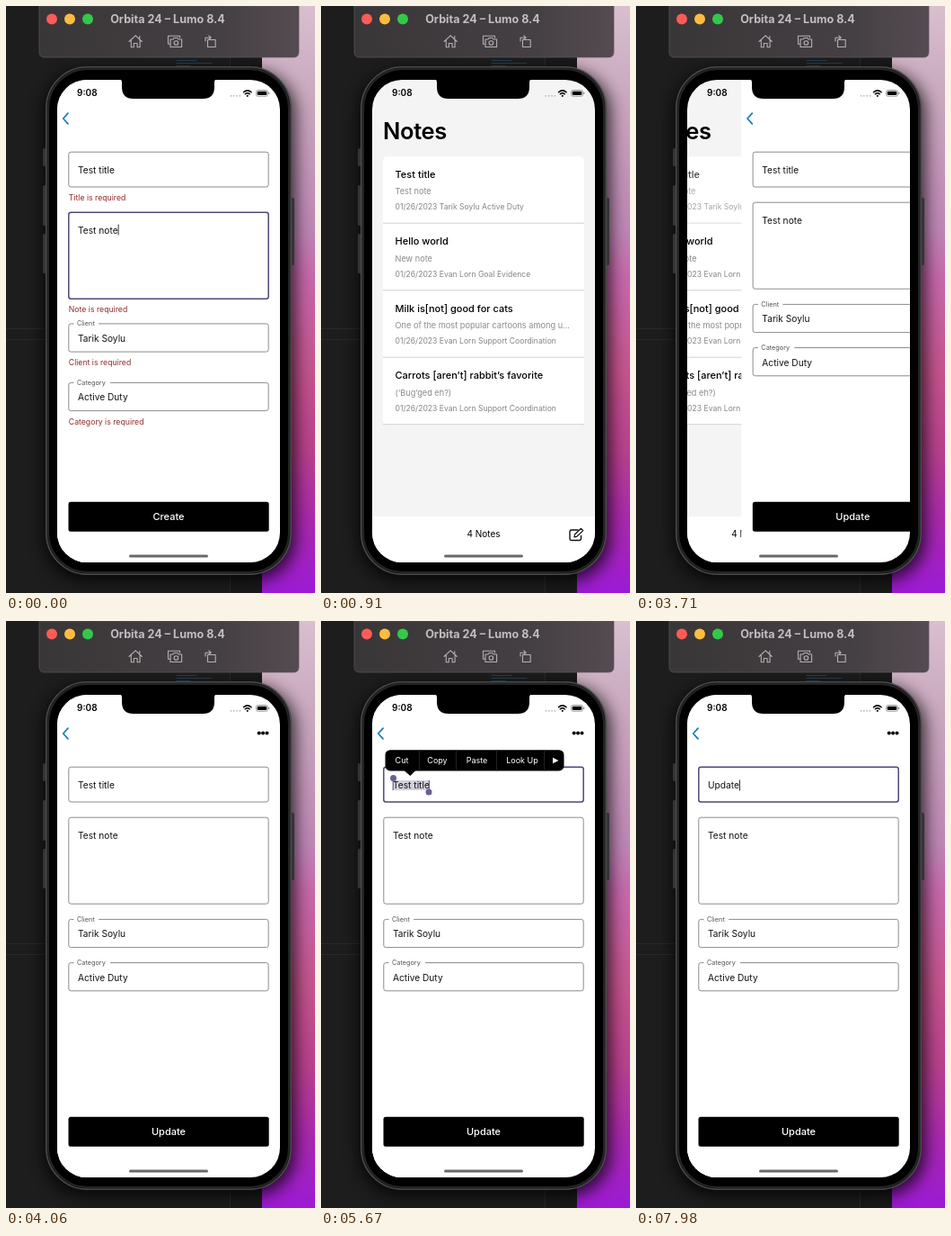
Write an HTML page that moves like this. It is 344 px wide and 652 px high and loops after 8000 ms.

```html
<!DOCTYPE html>
<html lang="en">
<head>
<meta charset="utf-8">
<title>Notes app</title>
<style>
  html, body { margin: 0; width: 100%; height: 100%; overflow: hidden; background: #1b1b1b; }
  svg { display: block; width: 344px; height: 652px; }
  text { font-family: Inter, sans-serif; white-space: pre; }
  .line { fill: none; stroke-linecap: round; stroke-linejoin: round; }
</style>
</head>
<body>
<svg id="stage" viewBox="0 0 344 652" xmlns="http://www.w3.org/2000/svg"></svg>
<script>
const LOOP = 8000, TICK = 70, WIDTH = 248;
const PURPLE = '#52467a', GREY = '#8b8b8b';

const rect = (x, y, w, h, fill, r = 0, more = '') =>
  `<rect x="${x}" y="${y}" width="${w}" height="${h}" rx="${r}" fill="${fill}" ${more}/>`;
const label = (x, y, size, str, fill = '#111', more = '') =>
  `<text x="${x}" y="${y}" font-size="${size}" fill="${fill}" ${more}>${str}</text>`;
const dot = (x, y, r, fill) => `<circle cx="${x}" cy="${y}" r="${r}" fill="${fill}"/>`;
const line = (d, stroke, w, more = '') =>
  `<path class="line" d="${d}" stroke="${stroke}" stroke-width="${w}" ${more}/>`;
const group = (id, body, more = '') => `<g id="${id}" ${more}>${body}</g>`;
const middle = 'text-anchor="middle"';

const defs = `<defs>
  <linearGradient id="wall" x1="0" y1="0" x2="0" y2="1">
    <stop offset="0" stop-color="#d9bfd0"/><stop offset=".15" stop-color="#c9a9be"/>
    <stop offset=".38" stop-color="#bd86b4"/><stop offset=".46" stop-color="#c668ab"/>
    <stop offset=".62" stop-color="#c4548d"/><stop offset=".76" stop-color="#b8408d"/>
    <stop offset=".87" stop-color="#a92aaa"/><stop offset="1" stop-color="#9c1ad4"/>
  </linearGradient>
  <linearGradient id="bar" x1="0" y1="0" x2="1" y2="0">
    <stop offset="0" stop-color="#393638"/><stop offset=".7" stop-color="#454043"/>
    <stop offset="1" stop-color="#554b52"/>
  </linearGradient>
  <filter id="soft" x="-30%" y="-20%" width="160%" height="140%"><feGaussianBlur stdDeviation="9"/></filter>
  <clipPath id="screen"><rect x="57" y="82" width="248" height="536" rx="33"/></clipPath>
</defs>`;

function desktop() {
  return rect(0, 0, 344, 652, '#1d1d1d') + rect(249, 0, 36, 652, '#1a1a1a') +
    rect(249, 57, 1, 595, '#2b2b2b') + rect(285, 0, 59, 652, 'url(#wall)') +
    line('M0 358.5H44M0 370.5H44', '#2a2a2a', 1) +
    line('M190 60.5H212M190 63.5H229M190 66.5H205', '#28506b', 1, 'opacity=".7"') +
    rect(42, 72, 280, 566, '#000', 46, 'filter="url(#soft)" opacity=".75"');
}

function titleBar() {
  const icon = '#b5afb3';
  return `<path d="M37 0H326V51q0 6-6 6H43q-6 0-6-6Z" fill="url(#bar)" stroke="#5d575a" stroke-width=".7"/>` +
    dot(51, 14.5, 6, '#fc5b57') + dot(71, 14.5, 6, '#fdbc40') + dot(91, 14.5, 6, '#34c84a') +
    label(180, 19, 12.6, 'Orbita 24 – Lumo 8.4', '#c3bec1', middle + ' font-weight="700"') +
    line('M137 39.5l7.2-6.6 7.2 6.6M139.3 38v7.8h3v-4.3h3.8v4.3h3V38M148.8 36.5v-3', icon, 1.1) +
    line('M182.3 42.3h-1.8v-9h13v1.8M183 37h3l1-1.5h4l1 1.5h3.6v8.5H183Z', icon, 1.1) +
    `<circle cx="189.4" cy="41" r="2.3" fill="none" stroke="${icon}" stroke-width="1.1"/>` +
    line('M224.5 37.5h8.7v8h-8.7ZM222 39v-3.8h6M225.8 33l2.4 2.2-2.4 2.2', icon, 1.1);
}

function phone() {
  const key = (x, y, h) => rect(x, y, 4, h, '#343435', 1.5);
  return key(41, 158, 20) + key(41, 199, 45) + key(41, 253, 44) + key(317, 213, 75) +
    rect(44.8, 67.8, 272.4, 563.4, '#111', 46, 'stroke="#4a4a4b" stroke-width="1.6"') +
    rect(47, 70, 268, 559, '#000', 44, 'stroke="#242425" stroke-width="2"');
}

function status() {
  const dots = [250.5, 253.8, 257.1, 260.4].map(x => dot(x, 99.8, .9, '#b5b5b5')).join('');
  return `<path d="M125 81q4 0 4 4v5q0 13 13 13H219q13 0 13-13V85q0-4 4-4Z" fill="#000"/>` +
    label(79, 100.4, 10, '9:08', '#000', 'font-weight="600"') + dots +
    line('M264.5 95.7q4.3-3.7 8.6 0M266.3 97.8q2.5-2 5 0', '#000', 1.5) + dot(268.8, 99.8, 1.1, '#000') +
    rect(278.5, 93.5, 13, 6.8, 'none', 2, 'stroke="#8a8a8a" stroke-width=".8"') +
    rect(279.7, 94.7, 10.6, 4.4, '#000', 1) + rect(292.3, 95.7, 1, 2.4, '#8a8a8a', .5) +
    rect(137, 609.6, 88, 3, '#6a6a6a', 1.5);
}

const notes = [
  ['Test title', 'Test note', 'Tarik Soylu Active Duty'],
  ['Hello world', 'New note', 'Evan Lorn Goal Evidence'],
  ['Milk is[not] good for cats', 'One of the most popular cartoons among u...', 'Evan Lorn Support Coordination'],
  ['Carrots [aren’t] rabbit’s favorite', '(‘Bug’ged eh?)', 'Evan Lorn Support Coordination']
];

function listPage() {
  const row = ([title, text, meta], i) => {
    const y = 167 + i * 74.5;
    return group('row' + i, label(82.5, y + 23.6, 11, title, '#000', 'font-weight="500"') +
      label(82.5, y + 42, 9.2, text, GREY) +
      label(82.5, y + 59.2, 8.6, '01/26/2023 ' + meta, '#858585') +
      rect(69, y + 73.7, 224, 1, '#d2d2d2'));
  };
  return rect(57, 82, WIDTH, 536, '#f4f4f4') +
    label(69, 148.3, 25.5, 'Notes', '#000', 'font-weight="600" letter-spacing="-.35"') +
    rect(69, 167, 224, 298.5, '#fff', 5) + notes.map(row).join('') +
    rect(57, 567, WIDTH, 51, '#fff') +
    label(181, 590, 10, '4 Notes', '#000', middle) +
    line('M286 582h-7.3q-1.7 0-1.7 1.7v8.1q0 1.7 1.7 1.7h9.1q1.7 0 1.7-1.7v-3.3', '#111', 1.4) +
    line('M282 589.8l.5-2.8 7-6.7 2.3 2.3-7 6.7Z', '#111', 1.2);
}

function formPage() {
  const box = (id, y, h, body) => group(id,
    rect(69.8, y, 222.4, h, '#fff', 2.5, `stroke="${GREY}" stroke-width="1"`) + body);
  const tag = (y, w, name, value) => rect(75.5, y - 2, w, 4, '#fff') +
    label(79, y + 2.5, 7.3, name, '#555') + label(80, y + 20, 10.2, value);
  const error = (y, name) => label(69.8, y, 8.7, name + ' is required', '#8f2c2c');
  return rect(57, 82, WIDTH, 536, '#fff') +
    line('M69 119.2l-5.3 5.8 5.3 5.8', '#1b7fc0', 1.8) +
    group('more', [281.7, 286.1, 290.5].map(x => dot(x, 124.6, 2, '#000')).join('')) +
    box('titleBox', 162.2, 38.8,
      rect(80, 177, 40.5, 11, '#d5d0de', 0, 'id="marked"') +
      label(80, 186, 10.2, 'Test title', '#111', 'id="titleText"')) +
    box('noteBox', 218.2, 96, label(80, 241.6, 10.2, 'Test note', '#111', 'id="noteText"')) +
    box('clientBox', 331.4, 31.2, tag(331.4, 27.5, 'Client', 'Tarik Soylu')) +
    box('categoryBox', 379.6, 31.2, tag(379.6, 40.5, 'Category', 'Active Duty')) +
    group('errors', error(216, 'Title') + error(340.2, 'Note') + error(399.2, 'Client') + error(465, 'Category')) +
    rect(80, 176.5, 1, 12, '#333', 0, 'id="caret"') +
    group('button', rect(69.5, 550.7, 223.2, 33, '#000', 2.5) +
      label(181, 571.3, 11, 'Create', '#fff', middle + ' id="action" font-weight="500"')) +
    group('handles', rect(79.6, 175, 1.2, 13, '#6b5f94') + rect(119.8, 177, 1.2, 13, '#6b5f94') +
      dot(80.5, 174.5, 3.5, '#6b5f94') + dot(120, 190, 3.5, '#6b5f94')) +
    group('menu', rect(71.5, 143.2, 199, 23.2, '#000', 5.5) +
      '<path d="M92.5 166h13l-6.2 6Z" fill="#000"/>' +
      [109, 150, 195, 248].map(x => rect(x, 143.2, .8, 23.2, '#2b2b2b')).join('') +
      [['Cut', 90], ['Copy', 129.5], ['Paste', 173.5], ['Look Up', 224]]
        .map(([s, x]) => label(x, 158.2, 9, s, '#fff', middle)).join('') +
      '<path d="M258 151.8l6.5 3.2-6.5 3.2Z" fill="#fff"/>');
}

const stage = document.getElementById('stage');
stage.innerHTML = defs + desktop() + titleBar() + phone() +
  `<g clip-path="url(#screen)">${group('list', listPage())}${group('form', formPage())}${status()}</g>`;

const ui = {};
stage.querySelectorAll('[id]').forEach(e => ui[e.id] = e);
const set = (name, key, value) => ui[name].setAttribute(key, value);
const show = (name, on) => set(name, 'opacity', +on);
const move = (name, x, y = 0) => set(name, 'transform', `translate(${x} ${y})`);
const write = (name, str) => { if (ui[name].textContent !== str) ui[name].textContent = str; };
const ramp = (t, from, to) => Math.min(1, Math.max(0, (t - from) / (to - from)));

// Critically damped slide, settled after 560 ms.
function slide(t, start) {
  if (t <= start) return 0;
  if (t >= start + 560) return 1;
  const s = 13 * (t - start) / 1000;
  return 1 - (1 + s) * Math.exp(-s);
}

const typed = [[0, 'Test title'], [6790, 'Title'], [7350, 'U'], [7630, 'Up'], [7700, 'Upda'], [7840, 'Updat'], [7980, 'Update']];

function border(name, focused) {
  const edge = ui[name].firstElementChild;
  edge.setAttribute('stroke', focused ? PURPLE : GREY);
  edge.setAttribute('stroke-width', focused ? 1.5 : 1);
}

function draw(t) {
  const creating = t < 2000, invalid = t < 420;
  const away = creating ? slide(t, 350) : 1 - slide(t, 3500);
  move('form', WIDTH * away);
  move('list', -.3 * WIDTH * (1 - away));

  show('row0', t < 3290 ? 1 : .25 + .75 * ramp(t, 3570, 3780));
  show('errors', invalid);
  move('noteBox', 0, invalid ? 11 : 0);
  move('clientBox', 0, invalid ? 21.5 : 0);
  move('categoryBox', 0, invalid ? 38.8 : 0);
  border('noteBox', invalid);
  border('titleBox', t >= 5250);

  show('more', !creating);
  write('action', creating ? 'Create' : 'Update');
  set('button', 'opacity', creating ? 1 - .54 * ramp(t, 70, 280) : 1);

  const selecting = t >= 5390 && t < 6790;
  show('marked', selecting);
  show('handles', selecting);
  show('menu', ramp(t, 5320, 5670) * (1 - ramp(t, 6720, 7000)));

  write('titleText', typed.filter(([at]) => at <= t).pop()[1]);
  const empty = t >= 6790 && t < 7350;
  set('titleText', 'fill', empty ? '#8f8f8f' : '#111');

  const inNote = t < 140;
  show('caret', inNote || t >= 5250 && !selecting);
  const width = empty ? 0 : ui[inNote ? 'noteText' : 'titleText'].getComputedTextLength();
  move('caret', width, inNote ? 66 : 0);
}

const start = performance.now();
function frame() {
  const t = (performance.now() - start) % LOOP;
  draw(Math.floor(t / TICK) * TICK);
  requestAnimationFrame(frame);
}
frame();
</script>
</body>
</html>
```
